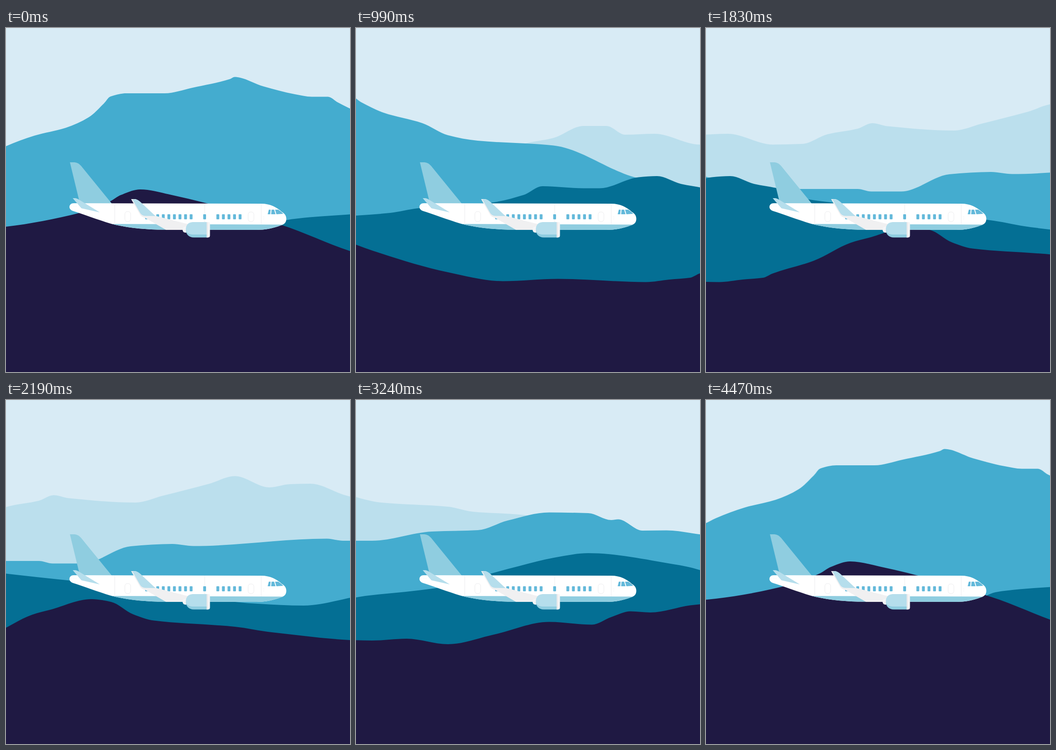
An HTML page for the animation above (4.5 s loop, 748x748 px).

```html
<!DOCTYPE html>
<html lang="en">
<head>
<meta charset="utf-8">
<title>Plane over hills</title>
<style>
  html, body { margin: 0; width: 100%; height: 100%; overflow: hidden; background: #d8ebf5; }
  svg { display: block; width: 100vw; height: 100vh; }
</style>
</head>
<body>
<svg viewBox="0 0 748 748">
  <defs>
    <path id="hull" d="M147 381L555 382C575 382 589 390 600 400C607 404 609.5 409 609.5 415C609.5 423 605 427 598 429C580 436 562 439 545 439L330 438.5C292 437.5 257 433 228 425.5C200 417 168 405 146 398C140 396 138 392 138 389.5C138 384 142 381 147 381Z"/>
    <clipPath id="hullClip"><use href="#hull"/></clipPath>
  </defs>

  <g id="land"><g id="tile"></g></g>

  <g id="plane">
    <path fill="#8fcde0" d="M139 292H149Q157 292.5 163 299.5L231 383H161Z"/>
    <use href="#hull" fill="#fff"/>
    <path fill="#8fcde0" clip-path="url(#hullClip)" d="M220 426L610 427.5V442H220Z"/>
    <g fill="none" stroke="#ececee">
      <path d="M236.5 382V427M432 382V427M555 382V427"/>
      <rect x="258.5" y="399" width="12.5" height="22" rx="5.5"/>
      <rect x="526.5" y="400" width="12.5" height="21" rx="5.5"/>
      <path stroke-dasharray="1.5 3" d="M560.5 410V417M147 388H155"/>
    </g>
    <path fill="#b5deec" d="M145 370H151Q155 370.5 160 374L204 401L164 392Z"/>
    <g id="windows" fill="#64b9da">
      <path d="M571.5 395H575.5L574.5 405H569Z"/>
      <path d="M577.5 395H583L586 405H576.5Z"/>
      <path d="M585 395H592Q598 398.5 603 404L588 405Z"/>
    </g>
    <path fill="#f0f0f1" d="M272 372H282L325 408.5L398 427V439H348L303 413Q294 411 291 405Z"/>
    <path fill="#b5deec" d="M275 373L282 372Q287 373.5 291 377L325 409L301 408.5Q294 407 291 401Z"/>
    <rect x="384" y="432" width="16" height="13" rx="6" fill="#f5f5f6"/>
    <path fill="#8fcde0" d="M391 440H438V455.5H408Q393 455 391 440Z"/>
    <path fill="#b5deec" d="M406 422H438V449H405Q391 448 391 437Q392 423 406 422Z"/>
    <path fill="#f5f5f5" d="M436.5 422H441Q443.5 422 443.5 425V451Q443.5 455.5 439 455.5H436.5Z"/>
    <path fill="#e6e6e8" d="M436.5 422H438.5V455.5H436.5Z"/>
  </g>
</svg>
<script>
const SVG = 'http://www.w3.org/2000/svg';
const LOOP = 4500, STEPS = 150, WIDTH = 3225, FLOOR = 750;
const $ = id => document.getElementById(id);

function add(parent, tag, attrs) {
  const el = document.createElementNS(SVG, tag);
  for (const key in attrs) el.setAttribute(key, attrs[key]);
  return parent.appendChild(el);
}

// A seamless hill line: flat at peaks and dips, smooth in between
function addRidge(fill, ...xy) {
  const n = xy.length / 2;
  const at = i => {
    const k = (i + n) % n;
    return [xy[2 * k] + Math.floor(i / n) * WIDTH, xy[2 * k + 1]];
  };
  const rise = i => {
    const [x0, y0] = at(i), [x1, y1] = at(i + 1);
    return (y1 - y0) / (x1 - x0);
  };
  const slope = i => {
    const a = rise(i - 1), b = rise(i);
    return a * b > 0 ? 2 * a * b / (a + b) : 0;
  };
  let d = `M${at(0)}`;
  for (let i = 0; i < n; i++) {
    const [x0, y0] = at(i), [x1, y1] = at(i + 1), h = (x1 - x0) / 3;
    d += `C${x0 + h},${y0 + h * slope(i)} ${x1 - h},${y1 - h * slope(i + 1)} ${x1},${y1}`;
  }
  add($('tile'), 'path', { fill, d: `${d}H${WIDTH + 1}V${FLOOR}H0Z` });
}

addRidge('#bbdfed',
  0, 400, 1000, 285, 1074, 252, 1139, 239, 1204, 213, 1254, 213, 1295, 232, 1359, 230,
  1457, 253.5, 1521, 252, 1576, 231, 1641, 219, 1673, 207, 1706, 213.5, 1851, 223,
  1911, 208, 2012, 182, 2067, 165.5, 2142, 190, 2187, 183, 2232, 182, 2307, 207,
  2377, 223, 2522, 232, 2577, 243, 2687, 250, 2800, 290);

addRidge('#44accf',
  0, 257, 62, 234, 130, 217, 180, 194, 213, 164, 227, 149, 262, 142, 345, 142, 405, 130,
  487, 111, 497, 106.5, 560, 127, 628, 144, 665, 149.5, 700, 149.5, 722, 162, 769, 184,
  854, 207, 909, 233, 974, 245, 1139, 255.5, 1330, 328, 1516, 350, 1641, 350, 1671, 355.5,
  1736, 355.5, 1841, 318, 1931, 313, 1977, 317.5, 2267, 301.5, 2302, 306, 2357, 306,
  2487, 286, 2587, 283, 2652, 262, 2742, 244.5, 2827, 246, 2877, 261, 2892, 259.5,
  2945, 284, 2997, 283.5, 3100, 294.5, 3158, 287, 3199, 270);

addRidge('#046f94',
  0, 470, 560, 436, 608, 418, 660, 411.5, 784, 402, 844, 392, 1001, 380, 1074, 363,
  1115, 344, 1204, 348.5, 1239, 348.5, 1324, 324.5, 1364, 322, 1416, 339, 1464, 348,
  1531, 372, 1591, 380, 1827, 405, 1937, 419, 2017, 433, 2117, 443, 2217, 447, 2342, 426,
  2457, 414, 2532, 403, 2575, 389, 2677, 361, 2752, 343, 2827, 333, 3012, 357, 3076, 372,
  3150, 440);

addRidge('#1f1943',
  0, 432, 160, 402, 226, 377, 250, 363, 292, 351, 360, 363, 598, 428, 748, 485, 909, 531,
  1029, 550.5, 1149, 545.5, 1340, 552.5, 1391, 547, 1436, 543, 1456, 534, 1546, 506,
  1626, 467, 1666, 456, 1755, 433, 1798, 439, 1846, 466, 1891, 479.5, 2067, 493, 2147, 505,
  2357, 523, 2432, 519, 2522, 531, 2622, 510, 2742, 482.5, 2835, 488.5, 2877, 472,
  2919, 459.5, 2962, 462, 3053, 446);

add($('land'), 'use', { href: '#tile', x: WIDTH });

function windowRow(x, count) {
  for (let i = 0; i < count; i++) {
    add($('windows'), 'rect', { x: x + i * 12.1, y: 405, width: 6.2, height: 11, rx: 1.3 });
  }
}
windowRow(302.6, 9);
windowRow(428.8, 1);
windowRow(457.5, 5);

$('land').animate(
  [{ transform: 'translateX(0px)' }, { transform: `translateX(${-WIDTH}px)` }],
  { duration: LOOP, iterations: Infinity, easing: `steps(${STEPS})` }
);
</script>
</body>
</html>
```
